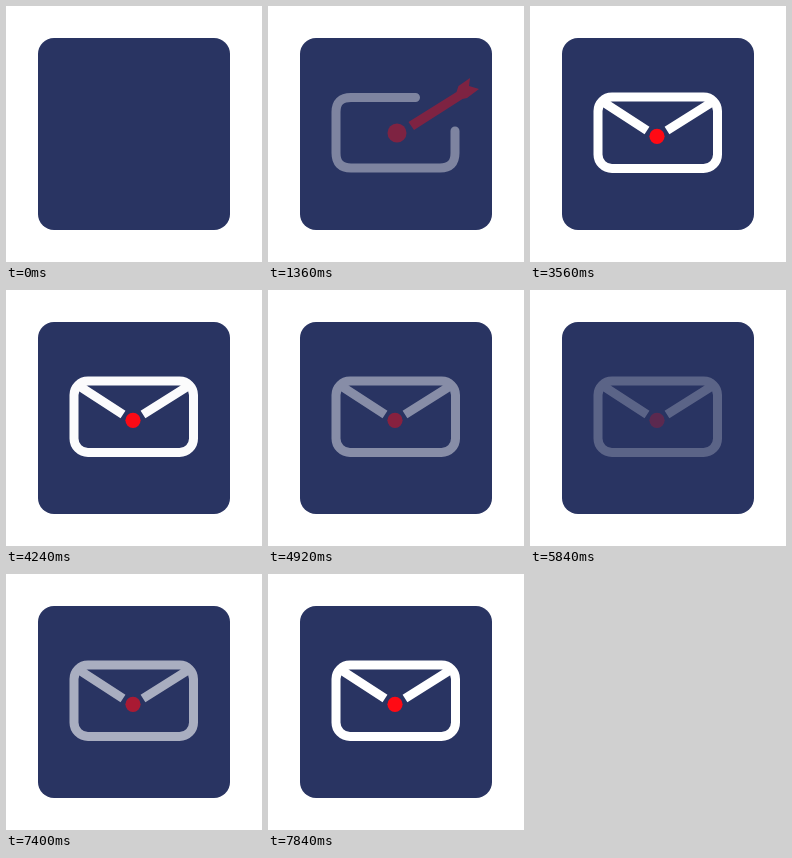
These frames come from a looping animation (256 by 256 pixels, 8.28 s). An HTML page:

```html
<!DOCTYPE html>
<html lang="en">
<head>
<meta charset="utf-8">
<title>Mail icon</title>
<style>
  html, body { margin: 0; width: 100%; height: 100%; overflow: hidden; background: #fff; }
  svg { display: block; width: 100vw; height: 100vh; }
  .line { fill: none; stroke: #fff; stroke-width: 9; }
  .red { fill: #ff0a14; }
</style>
</head>
<body>
<svg viewBox="0 0 256 256">
  <rect x="32" y="32" width="192" height="192" rx="16" fill="#293462"/>
  <g id="aim" opacity="0">
    <g id="board">
      <path class="line" stroke-linecap="round"
        d="M147.500 91.500H83Q68 91.500 68 106V147Q68 162 83 162H172Q187 162 187 147V125"/>
      <circle class="red" cx="129" cy="127" r="9.500"/>
    </g>
    <path id="arrow" class="red"
      d="M140.500 116L188.500 86L190.500 80L202 72L201 80L211 83L199 92L194.500 93L146 124Z"/>
  </g>
  <g id="mail" opacity="0">
    <rect class="line" x="68" y="91" width="119.500" height="71.500" rx="14"/>
    <path class="line" d="M70 94L117 124.500M185.500 94L137 124.500"/>
    <circle class="red" cx="127" cy="130.300" r="7.600"/>
  </g>
</svg>
<script>
  const LOOP = 8280, STEP = 40;
  const [aim, board, arrow, mail] =
    ['aim', 'board', 'arrow', 'mail'].map(id => document.getElementById(id));

  // Blinks: start, darkest moment, end
  const aimBlinks = [[1080, 1314, 1520]];
  const mailBlinks = [
    [3200, 3240, 3560], [3920, 3960, 4280], [4640, 4840, 5160],
    [5600, 5800, 6120], [6320, 6520, 6840], [7320, 7520, 7840]
  ];

  const part = (t, a, b) => Math.min(1, Math.max(0, (t - a) / (b - a)));
  const easeOut = u => 1 - (1 - u) ** 2;
  const backOut = u => 1 + 2.75 * (u - 1) ** 3 + 1.75 * (u - 1) ** 2;

  function blink(t, list) {
    const hit = list.find(([a, , c]) => t > a && t < c);
    if (!hit) return 1;
    const [a, b, c] = hit;
    return t < b ? 1 - part(t, a, b) : easeOut(part(t, b, c));
  }

  function scale(el, x, y, s) {
    el.setAttribute('transform', `translate(${x} ${y}) scale(${s}) translate(${-x} ${-y})`);
  }

  function draw(t) {
    scale(board, 127.5, 126.5, Math.max(0, backOut(part(t, 0, 520))));
    scale(arrow, 138, 121, 1 - (1 - part(t, 360, 960)) ** 3);
    aim.setAttribute('opacity', t < 2160
      ? part(t, 0, 160) * blink(t, aimBlinks) * (1 - part(t, 2080, 2160)) : 0);
    mail.setAttribute('opacity', easeOut(part(t, 2160, 2480)) * blink(t, mailBlinks));
  }

  const start = performance.now();
  function tick() {
    const t = (performance.now() - start) % LOOP;
    draw(Math.floor(t / STEP) * STEP);
    requestAnimationFrame(tick);
  }
  tick();
</script>
</body>
</html>
```
